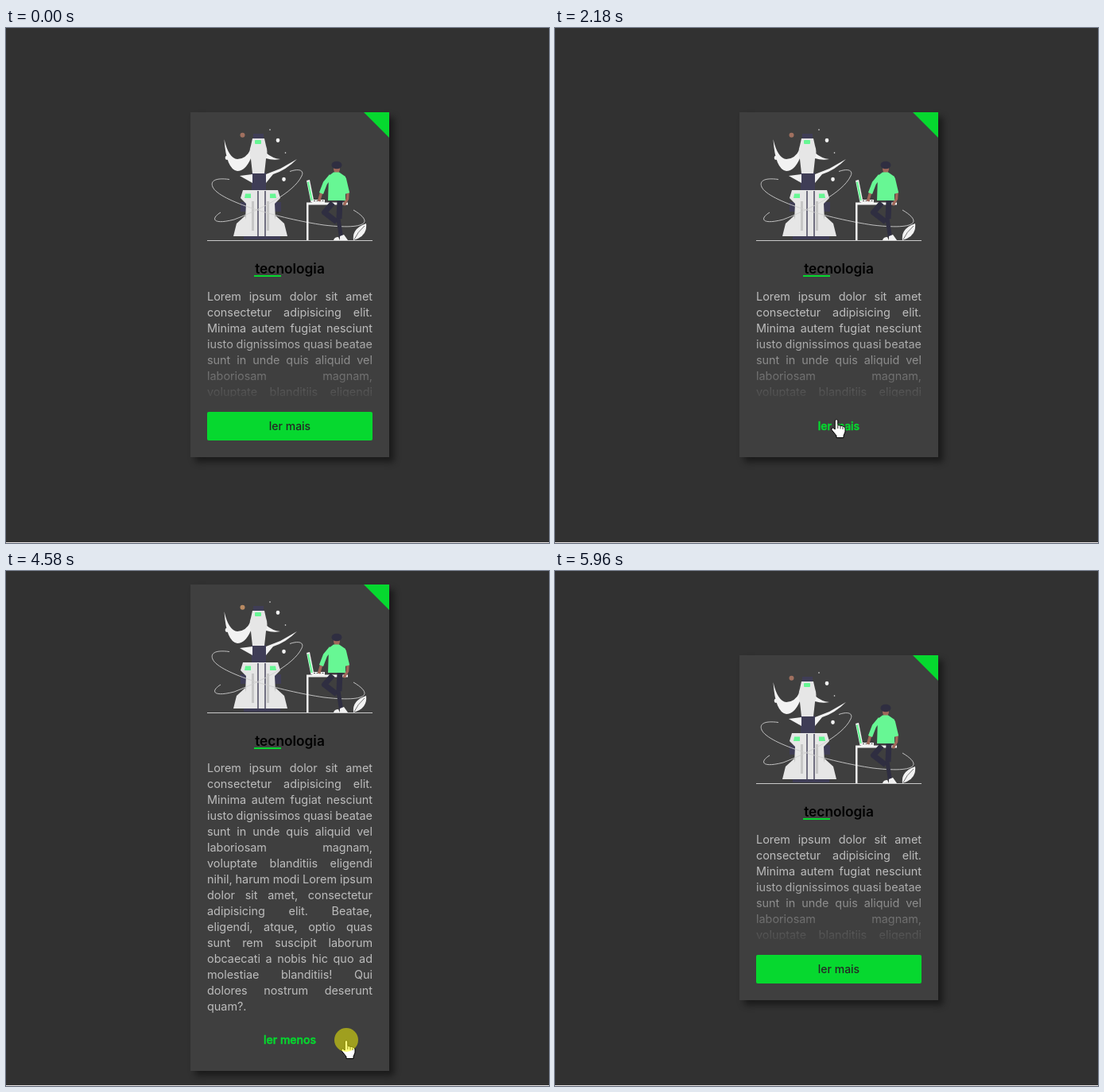
Write an HTML page that moves like this. It is 683 by 648 pixels and loops after 6370 ms.

```html
<!DOCTYPE html>
<html lang="pt">
<head>
<meta charset="utf-8">
<title>Card</title>
<style>
  html, body { margin: 0; width: 100%; height: 100%; overflow: hidden; background: #313131; }
  body { position: relative; font-family: Inter, "Open Sans", sans-serif; }
  #edge { position: absolute; left: 0; right: 0; top: 647px; height: 1px; background: #e9e4e6; }
  #card { position: absolute; left: 232px; width: 250px; background: #3f3f3f;
    box-shadow: 6px 6px 8px rgba(0, 0, 0, .48); }
  #card > * { position: absolute; }
  #art { left: 0; top: 0; }
  #title { left: 0; width: 250px; top: 185px; line-height: 24px; text-align: center;
    font-size: 17.3px; font-weight: 600; color: #000; }
  #bar { left: 80px; top: 205px; width: 34px; height: 2px; background: #06d82f; }
  #text { left: 21px; width: 208px; overflow: hidden; color: #bdbdbd; font-size: 14.4px; word-spacing: -.06em; }
  #text div { height: 20px; line-height: 20px; text-align-last: justify; }
  #text div:last-child { text-align-last: left; }
  #fade { left: 21px; width: 208px; top: 222px; height: 136px;
    background: linear-gradient(rgba(63, 63, 63, 0) 58px, #3f3f3f 144px); }
  #btn { left: 21px; width: 208px; border-radius: 2px; text-align: center;
    font-size: 14px; font-weight: 500; }
  #over { position: absolute; left: 0; top: 0; }
</style>
</head>
<body>
<div id="edge"></div>
<div id="card">
  <svg id="art" width="250" height="180" viewBox="232 106 250 180" fill="none">
    <path fill="#06d82f" d="M450 106H482V138z"/>
    <path stroke="#c9c9c9" d="M253 267.5H461"/>
    <!-- planets -->
    <circle id="planet" cx="297.5" cy="134.8" r="3"/>
    <g stroke="#f2f2f2" stroke-linecap="round">
      <path stroke-width="4.6" d="M342 141v.6M278 163v.6M349.5 190v.6"/>
      <path stroke-width="1.6" d="M332 128v0M351.5 157v0"/>
    </g>
    <!-- rocket: halves are mirrored -->
    <path fill="#3f3d56" d="M311 133H324V140H311zM309 182H327V204H309zM295 219H346V231H295zM299 258H345V266H299z"/>
    <g fill="#f2f2f2">
      <path d="M274.5 140Q280 164 291 165Q302 165 308 152V164Q301 180 291 180Q277 178 274.5 140z"/>
      <path d="M327 157Q335 164 345 165Q336 167 327 164z"/>
      <path d="M294 186L310 184V195z"/>
      <path d="M327 184L345 177L366 165Q352 179 336 184L327 195z"/>
    </g>
    <g fill="#e6e6e6">
      <path id="hull" d="M318 139H310L308 148Q305 156 308 165L310 183H318z"/>
      <use href="#hull" transform="translate(635) scale(-1 1)"/>
      <g id="booster">
        <path d="M320.5 204H298L295 214L302 221L300 262H320.5z"/>
        <path d="M301 236L290 246L286 262H301z"/>
        <path fill="#c6c6c6" d="M309 218H312V255H309z"/>
        <path fill="#67f794" d="M301 208.5H308V214H300z"/>
        <path fill="#3f3d56" d="M302 262H310V266H302z"/>
      </g>
      <use href="#booster" transform="translate(640) scale(-1 1)"/>
    </g>
    <path stroke="#3f3d56" stroke-width="1.4" d="M317 205V262M326 205V262"/>
    <rect x="313" y="141" width="8" height="5" rx="1" fill="#67f794"/>
    <!-- orbits -->
    <g stroke="#cfcfcf" stroke-width=".9">
      <path d="M281 190.5C262 188 257 193 260 200C268 218 345 240 400 248C452 254 464 245 437 229"/>
      <path d="M357 180.5C370 176 375 180 372 186C362 208 318 229 287 241C260 248 257 240 270 232"/>
    </g>
    <!-- desk and laptop -->
    <path fill="#f2f2f2" d="M378 219.5H430V222.5H380.5V267H378zM385 216H401V220H385z"/>
    <path stroke="#f2f2f2" stroke-width="4" d="M380 191.5L385.5 219"/>
    <path stroke="#67f794" stroke-width="2.2" d="M380 193.5L384.7 217"/>
    <path stroke="#555" stroke-dasharray="2 1.5" d="M387 217.5H400"/>
    <!-- person -->
    <g stroke-linejoin="round">
      <path stroke="#2f2e41" stroke-width="7" d="M411 220L400.5 232L416 244M420 217L419 240"/>
      <path stroke="#2f2e41" stroke-width="5" d="M418 240L421.5 263"/>
      <path stroke="#a0685a" stroke-width="3.5" d="M397 206L393.5 218M430 207L429.5 215L425 223"/>
      <ellipse cx="416" cy="177" rx="4" ry="6" fill="#a0685a"/>
      <ellipse cx="416" cy="172.5" rx="6.5" ry="4.8" fill="#2f2e41"/>
      <path stroke="#67f794" stroke-width="5.5" d="M409 186L401.5 195L396.5 208M425 189L429.5 208"/>
      <path fill="#67f794" d="M406 186L412 181.5H419L427 187V217H405z"/>
      <path fill="#f2f2f2" d="M412 267Q413 263 418 263L420 267zM420 262L425 260L430 267H420z"/>
    </g>
    <!-- leaf -->
    <path fill="#f2f2f2" d="M437 267Q435 252 453 246Q455 262 437 267z"/>
    <path stroke="#3f3f3f" stroke-width=".7" d="M438 266Q442 257 451 249"/>
  </svg>
  <div id="title">tecnologia</div>
  <div id="bar"></div>
  <div id="text"></div>
  <div id="fade"></div>
  <div id="btn"></div>
</div>
<svg id="over" width="683" height="648" viewBox="0 0 683 648">
  <g id="pointer" stroke-linejoin="round">
    <path id="arrow" fill="#fff" stroke="#000" d="M0 0V16L3.7 12.5L6.2 18.5L8.6 17.5L6 11.7H11z"/>
    <g id="hand" stroke="#000">
      <path fill="#fff" d="M-1.8 1.6Q0-.6 1.8 1.6V7.5L8 9Q11 9.5 11 12V16L9 21V23.5H0V21L-6 13.6Q-6.4 11-4.4 11L-1.8 13z"/>
      <path fill="none" stroke-width=".8" d="M1.8 8V12M5 9V12.5M8 10V13"/>
    </g>
    <path id="beam" fill="none" stroke="#dcdcdc" d="M0-3H2.2M3.8-3H6M3-2V8M0 9H2.2M3.8 9H6"/>
  </g>
  <circle id="click" r="15" fill="#ff0" fill-opacity=".5"/>
</svg>
<script>
const $ = id => document.getElementById(id);
const LOOP = 6370, OPEN = 2670, CLOSE = 4710, FADE = 200;

const lines = `Lorem ipsum dolor sit amet
consectetur adipisicing elit.
Minima autem fugiat nesciunt
iusto dignissimos quasi beatae
sunt in unde quis aliquid vel
laboriosam magnam,
voluptate blanditiis eligendi
nihil, harum modi Lorem ipsum
dolor sit amet, consectetur
adipisicing elit. Beatae,
eligendi, atque, optio quas
sunt rem suscipit laborum
obcaecati a nobis hic quo ad
molestiae blanditiis! Qui
dolores nostrum deserunt
quam?.`.split("\n");
for (const line of lines) {
  const row = document.createElement("div");
  row.textContent = line;
  $("text").append(row);
}

// Each glide eases the pointer to a new resting place
const glides = [
  { from: 900, to: 1490, x: 348, y: 492 },
  { from: 1710, to: 2250, x: 354, y: 492 },
  { from: 3130, to: 3450, x: 376, y: 587 },
  { from: 3450, to: 4180, x: 428, y: 590 },
  { from: CLOSE, to: 5260, x: 452, y: 502 },
  { from: 5260, to: 5850, x: 650, y: 641 }
];

// Times when the pointer enters and leaves the button
const visits = [[1340, OPEN], [3370, CLOSE], [5080, 5260]];

const ramp = (t, from, length) => Math.min(1, Math.max(0, (t - from) / length));
const smooth = u => u * u * (3 - 2 * u);
const within = (v, a, b) => v >= a && v < b;
const show = (id, on) => { $(id).style.display = on ? "" : "none"; };

function pointerAt(t) {
  let x = 336, y = 618;
  for (const g of glides) {
    const u = smooth(ramp(t, g.from, g.to - g.from));
    x += (g.x - x) * u;
    y += (g.y - y) * u;
  }
  return [Math.round(x), Math.round(y)];
}

const hoverAt = t => visits.reduce(
  (sum, [enter, leave]) => sum + ramp(t, enter, FADE) - ramp(t, leave, FADE), 0);

function drawCard(t, open) {
  const top = open ? 17 : 106;
  $("card").style.top = top + "px";
  $("card").style.height = (open ? 612 : 434) + "px";
  $("text").style.top = (open ? 221 : 222) + "px";
  $("text").style.height = (open ? 320 : 136) + "px";
  show("fade", !open);
  $("planet").setAttribute("fill", open ? "#b98a62" : "#a0705f");
}

function drawButton(t, open) {
  const h = hoverAt(t);
  const mix = (a, b) => Math.round(a + (b - a) * h);
  const btn = $("btn");
  btn.textContent = open ? "ler menos" : "ler mais";
  btn.style.top = (open ? 555 : 377) + "px";
  btn.style.height = (open ? 37 : 36) + "px";
  btn.style.lineHeight = "35px";
  btn.style.background = `rgba(6,216,47,${1 - h})`;
  btn.style.color = `rgb(${mix(38, 6)},${mix(38, 216)},${mix(38, 47)})`;
  btn.style.webkitTextStroke = `${.5 * h}px`;
}

function drawPointer(t, open) {
  const [x, y] = pointerAt(t);
  const inside = within(x, 253, 461);
  const onBtn = inside && (open ? within(y, 572, 609) : within(y, 483, 519));
  const onText = inside && open && within(y, 238, 558);
  show("pointer", within(t, 900, 5960));
  show("hand", onBtn);
  show("beam", onText);
  show("arrow", !onBtn && !onText);
  $("pointer").setAttribute("transform", `translate(${x} ${y})`);
  show("click", within(t, OPEN - 140, OPEN) || within(t, CLOSE - 200, CLOSE));
  $("click").setAttribute("cx", x);
  $("click").setAttribute("cy", y);
}

function draw(t) {
  const open = within(t, OPEN, CLOSE);
  drawCard(t, open);
  drawButton(t, open);
  drawPointer(t, open);
}

const start = performance.now();
function tick() {
  draw((performance.now() - start) % LOOP);
  requestAnimationFrame(tick);
}
tick();
</script>
</body>
</html>
```
